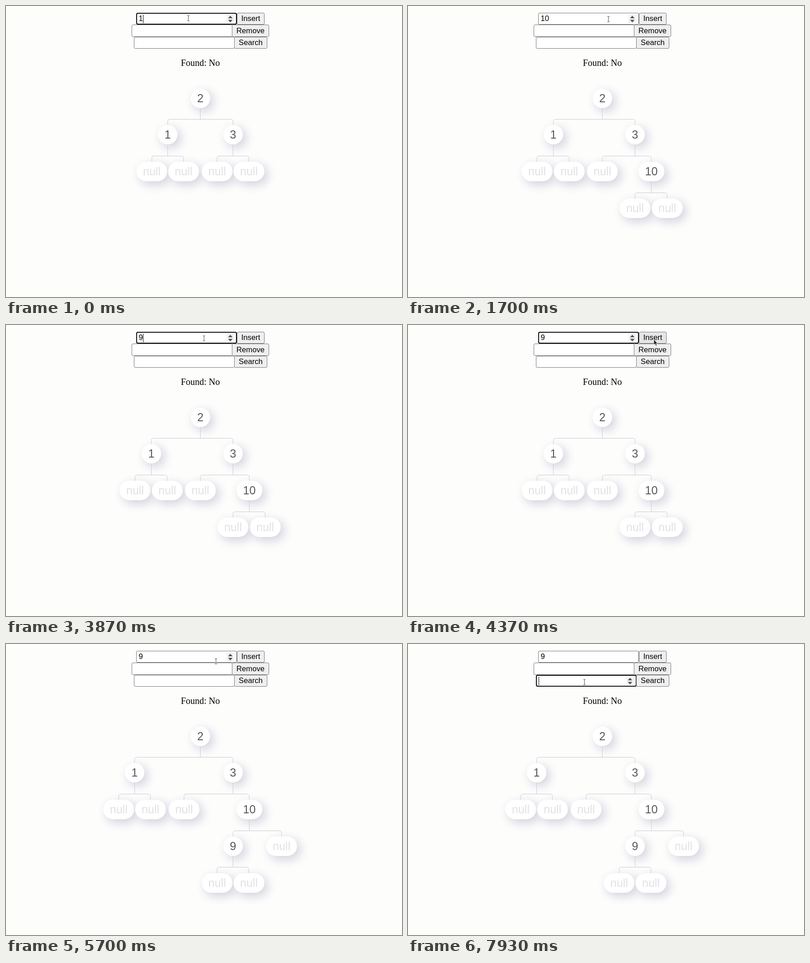
Recreate the animation shown at these times as an HTML page. Size 873x641 px, loop 8 s.

```html
<!DOCTYPE html>
<html lang="en">
<head>
<meta charset="utf-8">
<title>Binary search tree</title>
<style>
  html, body { margin: 0; width: 100%; height: 100%; overflow: hidden; background: #fdfdfc; }
  body { position: relative; font: 16.67px/24px "Liberation Sans", Arial, sans-serif; color: #000; }
  body *, svg { position: absolute; box-sizing: border-box; }
  .anim { animation: 8s step-end infinite; }

  /* form */
  .field { width: 222px; background: #fff; border: 1px solid #767676; border-radius: 3px; }
  .button { background: #efefef; border: 1px solid #767676; border-radius: 3px; text-align: center; }
  .row1 { top: 15px; height: 26px; }
  .row2 { top: 41px; height: 27px; line-height: 25px; }
  .row3 { top: 68px; height: 26px; }
  .field span { top: 0; left: 4.5px; }
  .field .second { left: 13.8px; }
  .ring { inset: -1px; border: 2px solid #101010; border-radius: 4px; }
  .caret { top: 3px; left: 4.5px; width: 1px; height: 19px; background: #000; }
  .spin { right: 5px; top: 2px; width: 17px; height: 20px; background: #f3f3f3; }
  .found { left: 0; top: 114px; width: 857px; text-align: center; font: 20px/23px "Liberation Serif", Times, serif; }

  /* tree */
  .tree, .tree svg { inset: 0; width: 873px; height: 641px; }
  .node {
    height: 43px; padding: 0 15px; border-radius: 22px; transform: translateX(-50%);
    background: #fff; color: #585858; font-size: 25px; line-height: 43px; white-space: nowrap;
    box-shadow: 7px 7px 22px #cfcfdc;
  }
  .empty { color: #e2e2e4; }
  .links { fill: none; stroke: #cacad4; }

  #cursor { left: 0; top: 0; animation: move 8s linear infinite; }
  #cursor svg { left: 0; top: 0; width: 1px; height: 1px; overflow: visible; }

  @keyframes one { 0% { visibility: visible } 37.5%, 100% { visibility: hidden } }
  @keyframes zero { 0% { visibility: hidden } 5% { visibility: visible } 35.875%, 100% { visibility: hidden } }
  @keyframes nine { 0% { visibility: hidden } 42.5%, 100% { visibility: visible } }
  @keyframes ring1 {
    0%, 26.25% { visibility: visible }
    15.4%, 59.6%, 100% { visibility: hidden }
  }
  @keyframes ring3 { 0% { visibility: hidden } 83.1%, 100% { visibility: visible } }
  @keyframes caret1 {
    0%, 26.25%, 35.875%, 55% { visibility: visible }
    11.25%, 32.1%, 48.75%, 59.6%, 100% { visibility: hidden }
  }
  @keyframes type1 {
    0%, 35.875%, 42.5%, 100% { left: 13.8px }
    5% { left: 23px }
    37.5% { left: 4.5px }
  }
  @keyframes caret3 {
    0%, 89.6% { visibility: hidden }
    83.1%, 95.9%, 100% { visibility: visible }
  }
  @keyframes spin1 {
    0%, 18.4%, 68.4% { visibility: visible }
    15.4%, 59.6%, 71.6%, 100% { visibility: hidden }
  }
  @keyframes spin2 { 0%, 75.1%, 100% { visibility: hidden } 71.6% { visibility: visible } }
  @keyframes spin3 { 0% { visibility: hidden } 75.1%, 100% { visibility: visible } }
  @keyframes press {
    0%, 18.4%, 68.4%, 100% { background: #efefef }
    10.6%, 16.6%, 52.5%, 60.9% { background: #e5e5e5 }
    15.4%, 59.6% { background: #f5f5f5 }
  }
  @keyframes tree0 { 0% { visibility: visible } 16.6%, 100% { visibility: hidden } }
  @keyframes tree1 { 0%, 60.9%, 100% { visibility: hidden } 16.6% { visibility: visible } }
  @keyframes tree2 { 0% { visibility: hidden } 60.9%, 100% { visibility: visible } }
  @keyframes arrow {
    0%, 18.4%, 68.4%, 100% { visibility: hidden }
    10.6%, 52.5% { visibility: visible }
  }
  @keyframes beam {
    0%, 18.4%, 68.4%, 100% { visibility: visible }
    10.6%, 52.5% { visibility: hidden }
  }
  @keyframes move {
    0% { transform: translate(402px, 27px) }
    4.125% { transform: translate(402px, 27px); animation-timing-function: ease-in-out }
    13.75%, 17.5% { transform: translate(529px, 31px) }
    21.25% { transform: translate(442px, 29px); animation-timing-function: ease-out }
    25.4% { transform: translate(415px, 29px) }
    45.9% { transform: translate(415px, 29px); animation-timing-function: ease-in-out }
    54.6% { transform: translate(542px, 32px) }
    55.4% { transform: translate(541px, 31px); animation-timing-function: step-end }
    57.5%, 66.6% { transform: translate(536px, 29px) }
    71.25% { transform: translate(463px, 38px) }
    76.6%, 80.4% { transform: translate(392px, 80px) }
    85.9%, 100% { transform: translate(389px, 84px) }
  }
</style>
</head>
<body>
  <div class="field row1" style="left:287px">
    <svg class="spin anim" style="animation-name:spin1" viewBox="0 0 17 20"><path d="M3.5 9 8.5 3.5 13.5 9ZM3.5 12.5H13.5L8.5 18Z" fill="#505050"/></svg>
    <span class="anim" style="animation-name:one">1</span>
    <span class="second anim" style="animation-name:zero">0</span>
    <span class="anim" style="animation-name:nine">9</span>
    <div class="caret anim" style="animation-name:caret1,type1"></div>
    <div class="ring anim" style="animation-name:ring1"></div>
  </div>
  <div class="button row1 anim" style="left:509px;width:61px;animation-name:press">Insert</div>

  <div class="field row2" style="left:277px">
    <svg class="spin anim" style="animation-name:spin2" viewBox="0 0 17 20"><path d="M3.5 9 8.5 3.5 13.5 9ZM3.5 12.5H13.5L8.5 18Z" fill="#505050"/></svg>
  </div>
  <div class="button row2" style="left:498px;width:82px">Remove</div>

  <div class="field row3" style="left:282px">
    <svg class="spin anim" style="animation-name:spin3" viewBox="0 0 17 20"><path d="M3.5 9 8.5 3.5 13.5 9ZM3.5 12.5H13.5L8.5 18Z" fill="#505050"/></svg>
    <div class="caret anim" style="animation-name:caret3"></div>
    <div class="ring anim" style="animation-name:ring3"></div>
  </div>
  <div class="button row3" style="left:503px;width:73px">Search</div>

  <div class="found">Found: No</div>
  <div id="trees"></div>

  <div id="cursor">
    <svg class="anim" style="animation-name:arrow"><path d="M0 0V11.5L2.6 9.3 4.6 14 6.6 13.2 4.6 8.6H8Z" fill="#222" stroke="#fff" stroke-width=".6"/></svg>
    <svg class="anim" style="animation-name:beam" fill="none"><path id="bar" d="M-2.5-6H-1L0-5 1-6H2.5M0-5V5M-2.5 6H-1L0 5 1 6H2.5" stroke="#fff" stroke-width="2.4"/><use href="#bar"/><path d="M-2.5-6H-1L0-5 1-6H2.5M0-5V5M-2.5 6H-1L0 5 1 6H2.5" stroke="#444"/></svg>
  </div>

<script>
  const TOP = 181.5, STEP = 80.8, HEIGHT = 43, BEND = 68, R = 5;

  const node = (label, x, left, right) => ({ label, x, left, right });
  const leaf = x => node('null', x);

  const trees = [
    node(2, 428.5,
      node(1, 356.5, leaf(321.5), leaf(391.5)),
      node(3, 500.5, leaf(465.5), leaf(535.5))),
    node(2, 428.5,
      node(1, 320.5, leaf(284.5), leaf(355.5)),
      node(3, 500.5, leaf(428.5),
        node(10, 536.5, leaf(500.5), leaf(571.5)))),
    node(2, 428.5,
      node(1, 283.5, leaf(248.5), leaf(318.5)),
      node(3, 500.5, leaf(392.5),
        node(10, 536.5,
          node(9, 500.5, leaf(465.5), leaf(535.5)),
          leaf(607.5))))
  ];

  // Stem down from the parent, then a rounded bracket onto both children.
  function link(x, l, r, top) {
    const y = Math.floor(top + BEND) + .5, end = top + STEP;
    return `M${x} ${top + HEIGHT}V${y}M${l} ${end}V${y + R}Q${l} ${y} ${l + R} ${y}` +
           `H${r - R}Q${r} ${y} ${r} ${y + R}V${end}`;
  }

  function draw(root, index) {
    let nodes = '', path = '';
    const visit = (n, depth) => {
      const top = TOP + depth * STEP;
      nodes += `<div class="node${n.left ? '' : ' empty'}" style="left:${n.x}px;top:${top}px">${n.label}</div>`;
      if (!n.left) return;
      path += link(n.x, n.left.x, n.right.x, top);
      visit(n.left, depth + 1);
      visit(n.right, depth + 1);
    };
    visit(root, 0);
    return `<div class="tree anim" style="animation-name:tree${index}">${nodes}` +
           `<svg class="links"><path d="${path}"/></svg></div>`;
  }

  document.getElementById('trees').innerHTML = trees.map(draw).join('');
</script>
</body>
</html>
```
